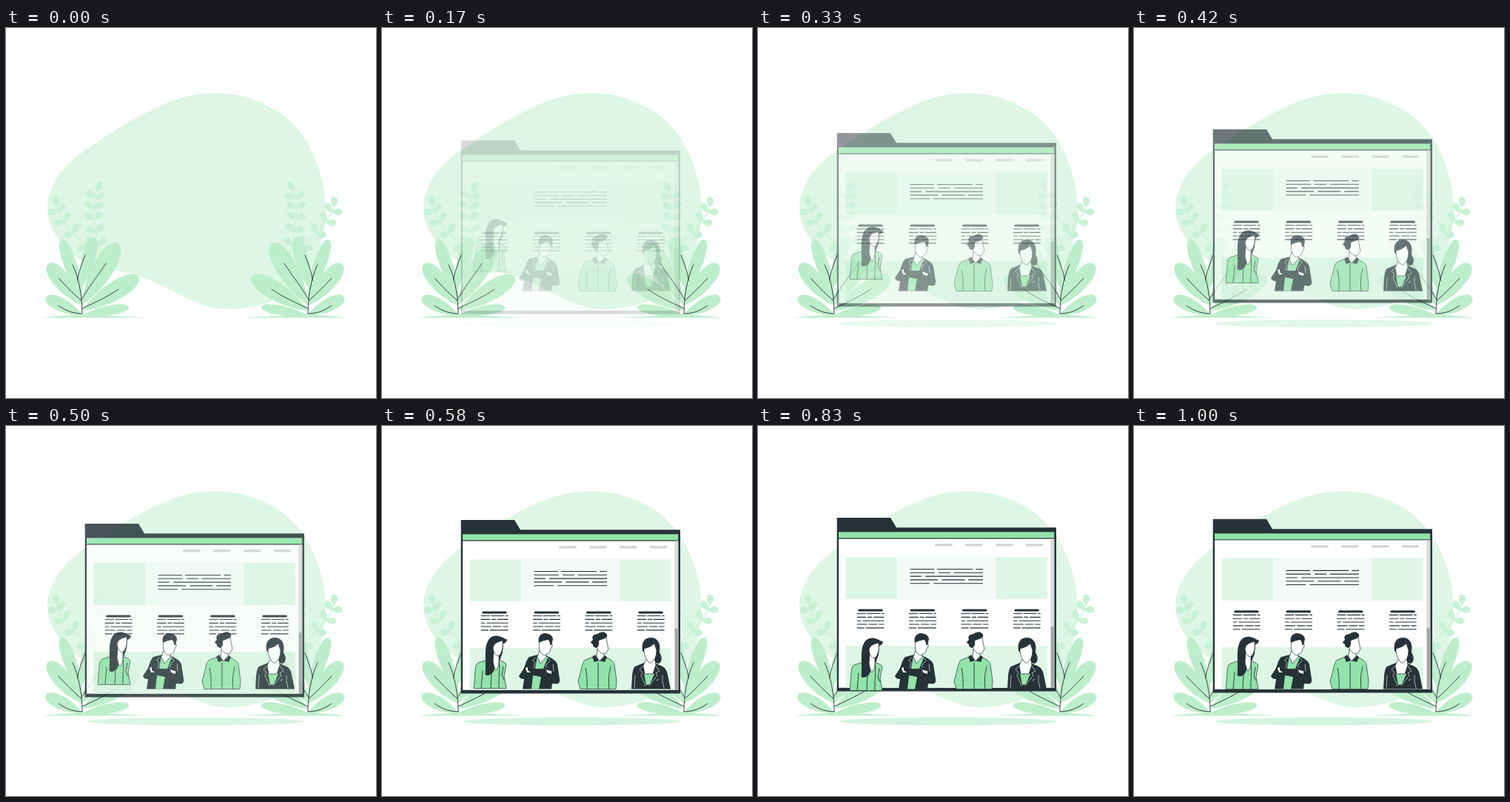
An HTML page for the animation above (1040 ms loop, 500x500 px).

```html
<!DOCTYPE html>
<html lang="en">
<head>
<meta charset="utf-8">
<title>Team page</title>
<style>
  html, body { margin: 0; width: 100%; height: 100%; overflow: hidden; background: #fff; }
  svg { display: block; width: 100%; height: 100%; }
  .ink { fill: #263238; }
  .green { fill: #92e3a9; }
  .leaf { fill: #bdeecb; }
  .sprig { fill: #c9f1d5; }
  .mist { fill: #def6e5; }
  .line, .seam { fill: none; stroke: #263238; stroke-width: .9; stroke-linecap: round; stroke-linejoin: round; }
  .seam { stroke: #fff; stroke-width: .6; }
  .skin, .cloth { fill: #fff; stroke: #263238; stroke-width: .7; stroke-linejoin: round; }
  .cloth { fill: #92e3a9; }
  .copy { fill: none; stroke: #263238; stroke-width: 1.1; vector-effect: non-scaling-stroke; }
  .title { fill: none; stroke: #263238; stroke-width: 3; stroke-linecap: round; }
</style>
</head>
<body>
<svg viewBox="0 0 500 500">
  <defs>
    <path id="paragraph" class="copy" d="M0 0h33m4 0h49m4 0h10M0 5h34m5 0h16.500m4.500 0h40M0 10h15.500m5.500 0h79M0 15h38m5.500 0h31.500m5 0h20M0 20h27m5 0h68"/>
  </defs>

  <path class="mist" d="M282 88C326 88 367 106 392 134C419 164 432 212 432 246C431 296 412 336 380 358C356 374 322 380 300 380C250 380 212 338 152 328C120 326 98 314 82 298C64 280 56 262 56 243C57 213 76 187 100 170C140 142 190 110 226 98C246 91 266 88 282 88Z"/>

  <g id="plant">
    <g id="sprigs" class="sprig"></g>
    <g id="leaves" class="leaf">
      <path d="M48 391.500Q76 388.500 102 387.500Q150 389 190 391.500Z"/>
    </g>
    <path class="line" d="M103 386C103 362 98 336 90 320M96.500 341C98 330 103 317 107 307M101.500 368C110 352 125 334 135 318M101.500 368C92 360 80 348 71 338M103 379C118 372 140 362 152 353M103 386C88 386 78 380 71 375"/>
  </g>
  <use href="#plant" transform="translate(511) scale(-1 1)"/>

  <ellipse class="fade" cx="256" cy="399.200" rx="147.500" ry="5.300" fill="#d3f4dd"/>

  <g id="window" class="fade">
    <path class="ink" d="M106.700 124H179L187 137.300H403V358.600H106.700Z"/>
    <path class="green" d="M109 143.300H400.300V151.300H109Z"/>
    <path fill="#fff" d="M109 152.400H400.300V353.800H109Z"/>
    <path fill="#dbdbdb" d="M395.300 152.400H400.300V353.800H395.300Z"/>
    <path fill="#a6a6a6" d="M395.800 271H400.800V353.800H395.800Z"/>
    <path d="M240.700 160.800h20.500m20.500 0h20.500m20.300 0h20.500m20.500 0h20.200" fill="none" stroke="#d5d5d5" stroke-width="3.500" stroke-linecap="round"/>
    <path class="mist" d="M118.500 177.200H391V233.800H118.500ZM118.500 297H391V353.800H118.500Z"/>
    <path fill="#f4fbf7" d="M188 177.700H322V233.300H188Z"/>
    <use href="#paragraph" transform="translate(205.500 193.500) scale(.985 .96)"/>
    <g id="columns"></g>
  </g>

  <g id="walker" class="fade">
    <path class="cloth" d="M142 319L130 323Q126 325 126 334L124 357.500H168L165 341L168 325Q166 322 158 319Z"/>
    <path class="line" d="M136 334L134 357M148 334L147 357M158 320C160 333 157 345 158 357M164 328L162 340L165 346"/>
    <path class="ink" d="M139.500 339C141 324 138 305 142 296C145 288 151 285.500 158 287C163 288 165 290.500 169 291.500Q168 296 164 297L163 309L159 320L153 316C153 326 153 333 149 337Q144 342 139.500 339Z"/>
    <path class="skin" d="M151 308L150 321Q152 331 154 333Q158 329 158 320V310Z"/>
    <path class="skin" d="M150 303C151 297 155 295 163 293C164 302 162 311 157 314Q151 312 150 303Z"/>
  </g>

  <g class="fade">
    <path class="ink" d="M211 309L199 312Q196 314 192 327L185 338Q186 342 192 342L190 355.500H229L230 348L237 348.500Q241 347 240 342L237 322Q236 317 224 311Z"/>
    <path class="green" d="M210 310L207 328H218L224 313L221 309ZM204 337L202 355.500H212L215 339Z"/>
    <path class="skin" d="M213 303L210 312L214 321L222 312V303Z"/>
    <path class="skin" d="M213 289C211 300 213 307 219 310C225 309 228 304 228 300Q231 299 230 295Q229 294 228 296L227 287Z"/>
    <path class="ink" d="M212 293C210 284 215 280 221 280Q230 281 231 288L229 296L227 295Q227 290 224 289Q217 290 212 293Z"/>
    <path class="seam" d="M207 313L204 317L207 320L205 327M224 313L227 317L223 321L221 327M231 322L232 331"/>
    <path fill="#fff" d="M194 327l3-1 0 4 4 3-5 0ZM222 329l5 2 2 0 0 4-6-2Z"/>
  </g>

  <g class="fade">
    <path class="cloth" d="M288 311L275 316Q271 318 269 330L265 345L268 355.500H316L317 345L314 322Q313 317 301 312Z"/>
    <path class="line" d="M292 320V355M275 327Q278 340 277 355M309 325Q305 340 307 355"/>
    <path class="skin" d="M291 302L290 312L294 318L300 312V304Z"/>
    <path class="ink" d="M288 309L284 312L287 319L293 317ZM301 310L304 312L301 319L294 317Z"/>
    <path class="skin" d="M291 290L291 301Q294 307 300 308Q304 307 304 304L306 302L303 286Z"/>
    <path class="ink" d="M282 293Q283 290 285 289Q282 282 291 281Q297 277 301 279Q305 281 304 285Q299 288 293 290L293 296L290 300Q284 299 285 295Z"/>
  </g>

  <g class="fade">
    <path class="ink" d="M354 320L342 325Q339 327 338 338L337 355.500H390L386 336Q384 326 377 324L368 320Z"/>
    <path class="ink" d="M352 304C350 291 356 286 363 286C373 286 377 294 375 306Q380 314 376 320Q370 323 367 316Z"/>
    <path class="green" d="M354 334L357 350L362 349L368 335Z"/>
    <path class="skin" d="M357 315L353 324L355 335H366L370 323L368 312Z"/>
    <path class="skin" d="M354 301Q363 299 368 294L371 303Q371 316 363 320.500Q354 317 354 301Z"/>
    <path class="seam" d="M353 324L348 329L352 333L350 337L356 351M370 324L375 331L370 334L372 337L361 351M342 337L341 354M379 337Q378 345 381 354M371 344L374 342"/>
  </g>
</svg>
<script>
  const LOOP = 1040, STEP = 1000 / 24, TOP = 124;
  const find = id => document.getElementById(id);
  const degrees = (dx, dy) => Math.atan2(dy, dx) * 180 / Math.PI;

  // A blade grows from its root to a rounded tip and is widest past the middle
  function blade(rootX, rootY, tipX, tipY, width) {
    const dx = tipX - rootX, dy = tipY - rootY, length = Math.hypot(dx, dy);
    const side = w => `C${length * .4} ${w * .7} ${length} ${w * .65} ${length} 0`;
    const back = `C${length} ${width * .65} ${length * .4} ${width * .7} 0 0`;
    return `<path d="M0 0${side(-width)}${back}Z" transform="translate(${rootX} ${rootY}) rotate(${degrees(dx, dy)})"/>`;
  }

  // A stalk is a quadratic curve with a top leaf and evenly spaced pairs
  function sprig([x0, y0], [x1, y1], [x2, y2], pairs) {
    const mix = (a, b, c, t) => (1 - t) ** 2 * a + 2 * t * (1 - t) * b + t * t * c;
    const slope = (a, b, c, t) => (1 - t) * (b - a) + t * (c - b);
    const petal = (t, turn) => {
      const x = mix(x0, x1, x2, t), y = mix(y0, y1, y2, t);
      const angle = (degrees(-slope(x0, x1, x2, t), -slope(y0, y1, y2, t)) + turn) * Math.PI / 180;
      return blade(x, y, x + 14 * Math.cos(angle), y + 14 * Math.sin(angle), 9);
    };
    let shapes = `<path d="M${x0} ${y0}Q${x1} ${y1} ${x2} ${y2}" fill="none" stroke="#c9f1d5" stroke-width="1.2"/>` + petal(0, 12);
    for (let i = 0; i < pairs; i++) {
      const t = .15 + .75 * i / (pairs - 1);
      shapes += petal(t, -60) + petal(t, 60);
    }
    return shapes;
  }

  find("sprigs").innerHTML =
    sprig([122, 221], [113, 250], [128, 304], 5) + sprig([68, 242], [74, 264], [118, 302], 4);

  find("leaves").innerHTML +=
    blade(104, 367, 75, 286, 17) + blade(101, 352, 119, 283, 18) +
    blade(103, 374, 151, 291, 28) + blade(103, 382, 179, 336, 25) +
    blade(103, 375, 57, 319, 23) + blade(103, 388, 54, 364, 18) +
    blade(103, 388, 166, 377, 13);

  for (let i = 0; i < 4; i++) {
    const x = 133.7 + 70.4 * i;
    find("columns").innerHTML += `<path class="title" d="M${x + 3} 249h30.500"/>
      <use href="#paragraph" transform="translate(${x} 253.500) scale(.368 .97)"/>`;
  }

  const fading = document.querySelectorAll(".fade");
  const windowGroup = find("window"), walker = find("walker");

  function draw(time) {
    const tick = Math.min(24, Math.floor((time % LOOP + 5) / STEP));
    const entry = Math.min(1, Math.max(0, (tick - 2) / 12));
    const top = tick <= 14 ? 157 - 30 * entry : TOP + .1 * (tick - 19.7) ** 2;
    fading.forEach(part => part.setAttribute("opacity", entry));
    windowGroup.setAttribute("transform", `translate(0 ${top - TOP})`);
    walker.setAttribute("transform", `translate(0 ${TOP - top})`);
  }

  const start = performance.now();
  function frame() {
    draw(performance.now() - start);
    requestAnimationFrame(frame);
  }
  frame();
</script>
</body>
</html>
```
